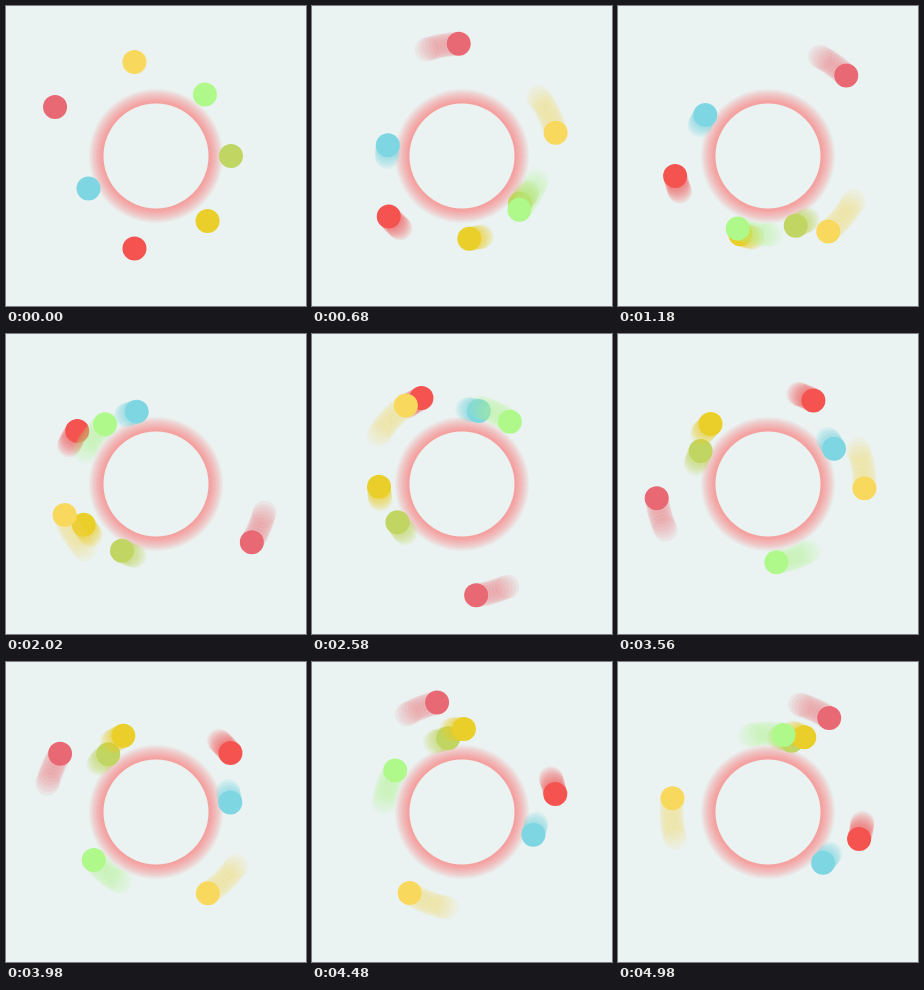
Recreate the animation shown at these times as an HTML page with a canvas. Size 300 by 300 pixels, loop 5000 ms.

```html
<!DOCTYPE html>
<html>
<head>
<meta charset="utf-8">
<style>
html, body { margin: 0; width: 100%; height: 100%; overflow: hidden; background: #eaf3f2; }
canvas { display: block; }
</style>
</head>
<body>
<canvas id="stage" width="300" height="300"></canvas>
<script>
const ctx = document.getElementById('stage').getContext('2d');
const BG = '#eaf3f2', STEP = 20, FRAMES = 250, TRAIL = 9, RAD = Math.PI / 180;

// colour, orbit radius, start angle (deg), speed (deg per second)
const balls = [
  ['#c0d562', 75, 0, 57.9],
  ['#7fd6e3', 74.9, 154.3, 49.87],
  ['#eacf2a', 83, 51.6, 49.05],
  ['#f4534f', 95, 103.1, 54.9],
  ['#e86973', 112.2, 205.9, 91.8],
  ['#f9d95d', 96.5, 257.1, 130.75],
  ['#aef98a', 78.6, 308.5, 139.15]
];

function disc(x, y, r, color, alpha = 1) {
  ctx.globalAlpha = alpha;
  ctx.fillStyle = color;
  ctx.beginPath();
  ctx.arc(x, y, r, 0, 2 * Math.PI);
  ctx.fill();
}

function draw(frame) {
  ctx.globalAlpha = 1;
  ctx.fillStyle = BG;
  ctx.fillRect(0, 0, 300, 300);

  // soft ring built from stacked discs
  for (let i = 10; i > 0; i--) disc(150, 150, 53 + i * 1.4, '#fa5055', 0.065);
  disc(150, 150, 52.5, BG);

  for (const [color, orbit, start, speed] of balls) {
    for (let k = Math.min(frame, TRAIL); k >= 0; k--) {
      const a = (start + speed * (frame - k) * STEP / 1000) * RAD;
      disc(150 + orbit * Math.cos(a), 150 + orbit * Math.sin(a), 12, color, k ? 0.1 : 1);
    }
  }
}

const origin = performance.now();
function tick() {
  draw(Math.floor((performance.now() - origin) / STEP) % FRAMES);
  requestAnimationFrame(tick);
}
tick();
</script>
</body>
</html>
```
